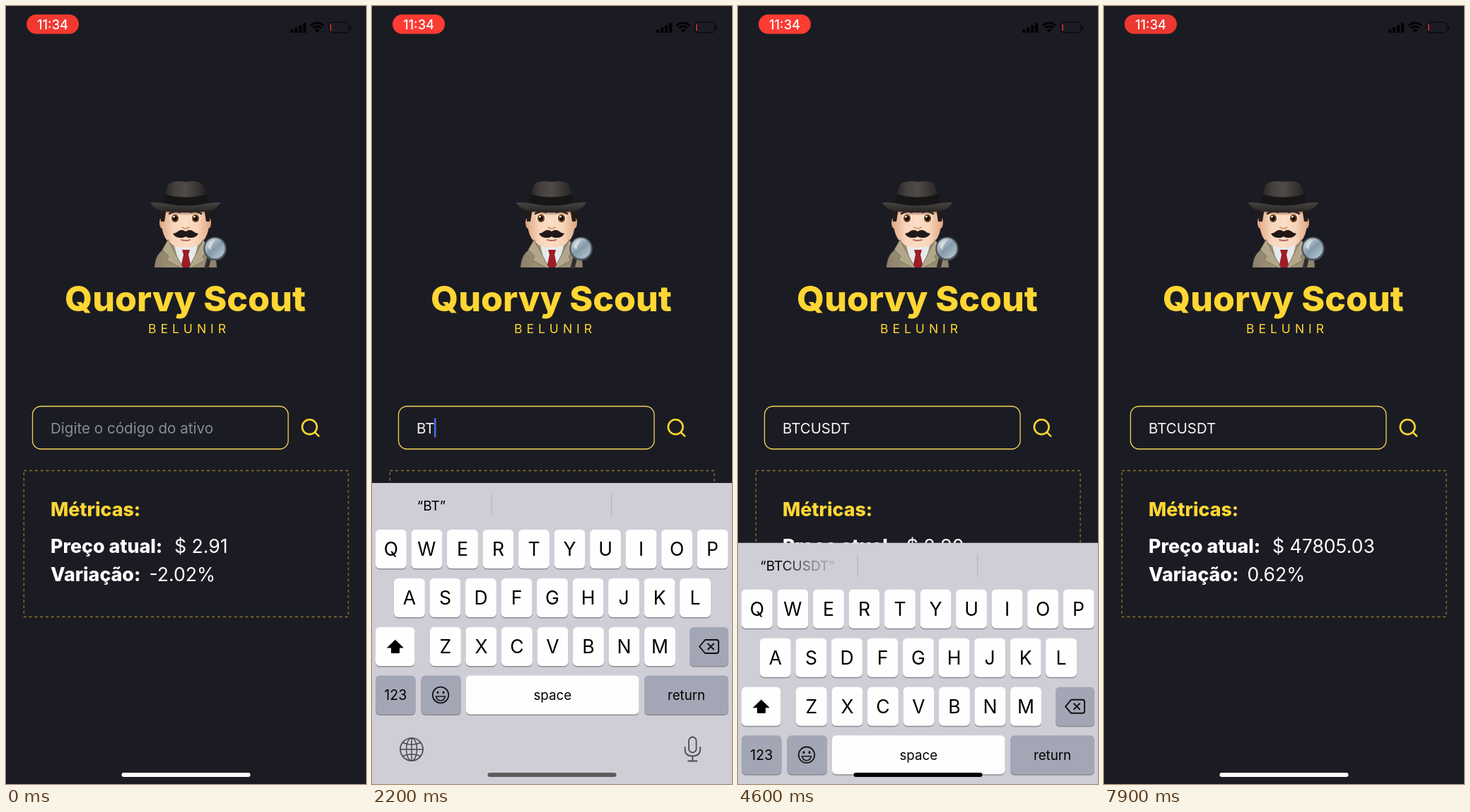
These frames come from a looping animation (509x1101 px, 8 s). An HTML page with a canvas:

```html
<!DOCTYPE html>
<html lang="pt">
<head>
<meta charset="utf-8">
<style>
html, body { margin: 0; width: 100%; height: 100%; overflow: hidden; background: #1b1c23; }
canvas { display: block; width: 509px; height: 1101px; }
</style>
</head>
<body>
<canvas id="stage" width="509" height="1101"></canvas>
<script>
const ctx = document.getElementById('stage').getContext('2d');
const LOOP = 8000, STEP = 100;
const YELLOW = '#ffd633', BG = '#1b1c23', KEY_GREY = '#a3a6b5', KEYBOARD = '#cfced7';
const KEYBOARD_TOP = 675, TRAVEL = 426;
const TYPED_AT = [1400, 2000, 2500, 2800, 3000, 3500, 3900];
const CODE = 'BTCUSDT';

function text(str, x, y, size, { weight = 400, color = '#000', align = 'left', spacing = 0 } = {}) {
  ctx.font = `${weight} ${size}px Inter, "Open Sans", sans-serif`;
  ctx.fillStyle = color;
  ctx.textAlign = align;
  ctx.letterSpacing = spacing + 'px';
  ctx.fillText(str, x, y);
  const width = ctx.measureText(str).width;
  ctx.letterSpacing = '0px';
  return width;
}

function box(x, y, w, h, r, color) {
  ctx.beginPath();
  ctx.roundRect(x, y, w, h, r);
  ctx.fillStyle = color;
  ctx.fill();
}

function fill(path, color) {
  ctx.fillStyle = color;
  ctx.fill(new Path2D(path));
}

function line(path, color, width) {
  ctx.strokeStyle = color;
  ctx.lineWidth = width;
  ctx.lineCap = ctx.lineJoin = 'round';
  ctx.stroke(new Path2D(path));
}

function oval(x, y, rx, ry, color) {
  ctx.beginPath();
  ctx.ellipse(x, y, rx, ry, 0, 0, 7);
  ctx.fillStyle = color;
  ctx.fill();
}

function ring(x, y, rx, ry, color, width) {
  ctx.beginPath();
  ctx.ellipse(x, y, rx, ry, 0, 0, 7);
  ctx.strokeStyle = color;
  ctx.lineWidth = width;
  ctx.stroke();
}

function gradient(x0, y0, x1, y1, ...colors) {
  const g = ctx.createLinearGradient(x0, y0, x1, y1);
  colors.forEach((c, i) => g.addColorStop(i / (colors.length - 1), c));
  return g;
}

// Piecewise linear value through [time, value] points.
function track(points, t) {
  const i = points.findIndex(p => p[0] > t);
  if (i < 0) return points[points.length - 1][1];
  if (i === 0) return points[0][1];
  const [t0, a] = points[i - 1], [t1, b] = points[i];
  return a + (b - a) * (t - t0) / (t1 - t0);
}

// Critically damped spring, 0 to 1.
function spring(ms) {
  const x = Math.max(0, ms) * 0.01826;
  return 1 - (1 + x) * Math.exp(-x);
}

function statusBar(t) {
  const pulse = Math.cos(2 * Math.PI * (t - 400) / 2000);
  const [r, g, b] = [[235, 21], [56, 4], [48, 4]].map(([mid, amp]) => Math.round(mid + amp * pulse));
  box(29, 12, 74, 27.5, 14, `rgb(${r},${g},${b})`);
  text('11:34', 66, 32.5, 18.3, { weight: 500, color: '#fff', align: 'center' });

  for (let i = 0; i < 4; i++) {
    const h = 5 + 3 * i;
    box(402 + 6 * i, 38 - h, 4.4, h, 1, '#030304');
  }
  ctx.lineCap = 'butt';
  ctx.strokeStyle = '#030304';
  for (const radius of [13, 8.2]) {
    ctx.beginPath();
    ctx.arc(440, 37, radius, -Math.PI * 0.75, -Math.PI * 0.25);
    ctx.lineWidth = 3;
    ctx.stroke();
  }
  fill('M440 38 L436.3 33.8 Q440 31 443.7 33.8 Z', '#030304');
  ctx.beginPath();
  ctx.roundRect(456.7, 22.7, 28, 15, 4.5);
  ctx.strokeStyle = '#0b0b0e';
  ctx.lineWidth = 1.4;
  ctx.stroke();
  box(486, 27.5, 2, 5.5, 1, '#0b0b0e');
  box(458, 25.5, 1.8, 9.5, 1, '#c5302a');
}

function detective() {
  // coat, shirt and tie
  fill('M210 370 Q211 349 227 342 L238 334 H272 L282 342 Q298 350 298 370 Z',
    gradient(210, 0, 298, 0, '#8b8069', '#a89c80', '#8b8069'));
  fill('M237 335 H272 L263 370 H246 Z', '#e6e9ec');
  // head
  oval(221, 307, 4, 8, '#dda684');
  oval(286, 307, 4, 8, '#dda684');
  fill('M220 285 H287 V309 Q285 342 254 342 Q222 342 220 309 Z',
    gradient(220, 0, 287, 0, '#e2ad8a', '#f8d5bb', '#fbddc5', '#f8d5bb', '#e2ad8a'));
  fill('M220 285 H287 V292 Q254 299 220 292 Z', 'rgba(150,95,65,.4)');
  fill('M218 286 H227 L224 305 H219 Z M289 286 H280 L283 305 H288 Z', '#241b19');
  for (const x of [239, 268]) {
    oval(x, 300.5, 6.6, 6, '#fff');
    oval(x, 300.5, 5.3, 5.7, '#7a4b1d');
    oval(x, 300.5, 3, 3.4, '#160d08');
    oval(x - 1.5, 298.3, 1.3, 1.3, '#fff');
  }
  line('M231 294 Q238 289 246 292 M261 292 Q269 289 276 294', '#2a1e1a', 2.4);
  line('M249 313 Q254 317 259 313', '#d99d78', 2);
  line('M248 331 Q254 333 260 331', '#b96a5a', 2);
  fill('M254 319 Q248 315 243 319 Q240 322 236 322 Q239 328 247 328 Q252 328 254 326 Q256 328 261 328 Q269 328 272 322 Q268 322 265 319 Q260 315 254 319 Z', '#211917');
  fill('M249 345 H260 L258 352 L262 370 H247 L251 352 Z', '#9e1c26');
  // raised collar and lapels
  const lapels = 'M229 331 L221 345 L230 354 L227 360 L246 370 H250 L236 344 Z M279 331 L287 345 L278 354 L281 360 L263 370 H259 L272 344 Z';
  fill(lapels, '#b3a78b');
  line(lapels, '#766b55', 0.9);
  // hat
  fill('M223 281 Q225 257 231 251 Q240 246 254 249 Q268 246 276 251 Q282 258 285 281 Z',
    gradient(223, 0, 285, 0, '#252322', '#45413e', '#504b47', '#3a3735', '#232120'));
  fill('M223 266 Q254 275 284 266 L286 283 Q254 290 222 283 Z', '#171616');
  fill('M204 278 Q214 278 222 279 Q254 286 286 279 Q294 278 303 278 Q300 285 289 290 Q254 295 219 290 Q207 285 204 278 Z',
    gradient(0, 278, 0, 293, '#4a4542', '#242120'));
  // magnifier
  line('M287 357 L284 369', '#302d2d', 6);
  oval(295.5, 343.5, 16.3, 16.8, '#50565d');
  oval(295.5, 343, 14, 14.5, gradient(284, 331, 306, 356, '#c9d7df', '#8599a8', '#b4c8d5'));
  fill('M285 341 Q287 332 296 331 Q291 336 289 345 Z', 'rgba(255,255,255,.5)');
}

function searchIcon(pressed) {
  ctx.globalAlpha = pressed ? 0.3 : 1;
  ring(429.2, 595.7, 10.4, 10.4, YELLOW, 2.6);
  line('M436.6 603.1 L442.2 608.7', YELLOW, 2.6);
  ctx.globalAlpha = 1;
}

function inputField(t, typed) {
  ctx.beginPath();
  ctx.roundRect(37.5, 566.5, 361.5, 60.5, 12);
  ctx.strokeStyle = '#f6d257';
  ctx.lineWidth = 1.3;
  ctx.stroke();
  const width = typed
    ? text(typed, 63, 604.5, 20.4, { color: '#f4f4f6' })
    : (text('Digite o código do ativo', 63, 604.5, 20.6, { color: '#888b9a' }), 0);
  if (t >= 500 && t < 4600) box(62.5 + width, 583, 2.6, 27.5, 1, '#4a6ce8');
}

function metrics(t) {
  ctx.setLineDash([3.92, 3.92]);
  ctx.lineCap = 'butt';
  ctx.strokeStyle = '#8f772d';
  ctx.lineWidth = 1.3;
  ctx.strokeRect(25.3, 657.5, 458.7, 207);
  ctx.setLineDash([]);
  const [price, change] = t < 2000 ? ['2.91', '-2.02%'] : t < 6500 ? ['2.90', '-2.06%'] : ['47805.03', '0.62%'];
  const label = { weight: 800, color: '#fff' }, value = { color: '#fff' };
  text('Métricas:', 63, 721.5, 26.8, { weight: 800, color: YELLOW });
  text('Preço atual:', 63, 774, 26.8, label);
  text('$ ' + price, 238, 774, 26.6, value);
  text('Variação:', 63, 814, 26.8, label);
  text(change, 202.5, 814, 26.6, value);
}

function key(x, y, w, caption, size, color = '#fefefe') {
  box(x, y + 1.4, w, 55, 6, '#8b8c92');
  box(x, y, w, 55, 6, color);
  if (caption) text(caption, x + w / 2, y + 27.5 + size * 0.365, size, { align: 'center' });
}

// Drawn with its top edge at y = 0.
function keyboard(t, typed) {
  box(0, 0, 509, TRAVEL, 0, KEYBOARD);
  box(168.5, 16, 1.2, 31, 0, '#b5b4bc');
  box(338, 16, 1.2, 31, 0, '#b5b4bc');
  if (typed) {
    const ink = t < 4600 ? '#000' : gradient(60, 0, 140, 0, '#000', '#77777d', '#b9b8c0');
    text(`“${typed}”`, 84, 39, 19, { align: 'center', color: ink });
  }
  [['QWERTYUIOP', 5, 66], ['ASDFGHJKL', 31, 135], ['ZXCVBNM', 82, 204]].forEach(([row, x, y]) =>
    [...row].forEach((c, i) => key(x + 50.52 * i, y, 43.8, c, 26.5)));
  key(5, 204, 55.5);
  key(449, 204, 55, '', 0, KEY_GREY);
  key(5, 272.5, 56.5, '123', 19.5, KEY_GREY);
  key(69.5, 272.5, 56.5, '', 0, KEY_GREY);
  key(133, 272.5, 244.5, 'space', 18.7);
  key(385, 272.5, 119, 'return', 18.7, t === 4400 ? '#fefefe' : KEY_GREY);

  const arrow = 'M33 222.5 L44 233 H38.5 V240.5 H27.5 V233 H22 Z';
  fill(arrow, '#000');
  line(arrow, '#000', 1);
  line('M471 222 H487 Q490 222 490 225 V238 Q490 241 487 241 H471 L463 231.5 Z M475 227.5 L483 235.5 M483 227.5 L475 235.5', '#111', 1.9);

  ring(97, 300, 11.3, 11.3, '#17171a', 1.8);
  oval(93, 296.5, 1.5, 2.1, '#17171a');
  oval(101, 296.5, 1.5, 2.1, '#17171a');
  line('M90.5 302 H103.5 Q102 308 97 308 Q92 308 90.5 302 Z', '#17171a', 1.6);

  const grey = '#4a4a50';
  ring(56, 377, 16, 16, grey, 1.7);
  ring(56, 377, 7.5, 16, grey, 1.5);
  line('M56 361 V393 M40 377 H72 M43.5 367.5 Q56 373 68.5 367.5 M43.5 386.5 Q56 381 68.5 386.5', grey, 1.5);
  ctx.beginPath();
  ctx.roundRect(448, 359.5, 10.5, 22, 5.2);
  ctx.lineWidth = 1.8;
  ctx.stroke();
  line('M442.5 374 V377 Q442.5 386.5 453.3 386.5 Q464 386.5 464 377 V374 M453.3 386.5 V393 M447 393.5 H459.5', grey, 1.8);
}

function homeIndicator(t) {
  const v = Math.round(track([[500, 255], [900, 165], [2200, 92], [3100, 32], [3700, 2],
    [5100, 2], [5500, 118], [7800, 255]], t));
  box(163.5, 1085, 182, 6, 3, `rgb(${v},${v},${v})`);
}

function draw(t) {
  box(0, 0, 509, 1101, 0, BG);
  const typed = CODE.slice(0, TYPED_AT.filter(at => t >= at).length);
  statusBar(t);
  detective();
  text('Quorvy Scout', 253.5, 432, 50, { weight: 800, color: YELLOW, align: 'center' });
  text('BELUNIR', 201, 463, 17.5, { color: YELLOW, spacing: 6 });
  inputField(t, typed);
  searchIcon(t >= 5900 && t < 6200);
  metrics(t);

  const shown = spring(t - 515) - spring(t - 4555);
  if (shown > 0.001) {
    ctx.save();
    ctx.translate(0, KEYBOARD_TOP + TRAVEL * (1 - shown));
    keyboard(t, typed);
    ctx.restore();
  }
  homeIndicator(t);
}

function tick() {
  const t = performance.now() % LOOP;
  draw(Math.floor(t / STEP) * STEP);
  requestAnimationFrame(tick);
}
tick();
</script>
</body>
</html>
```
